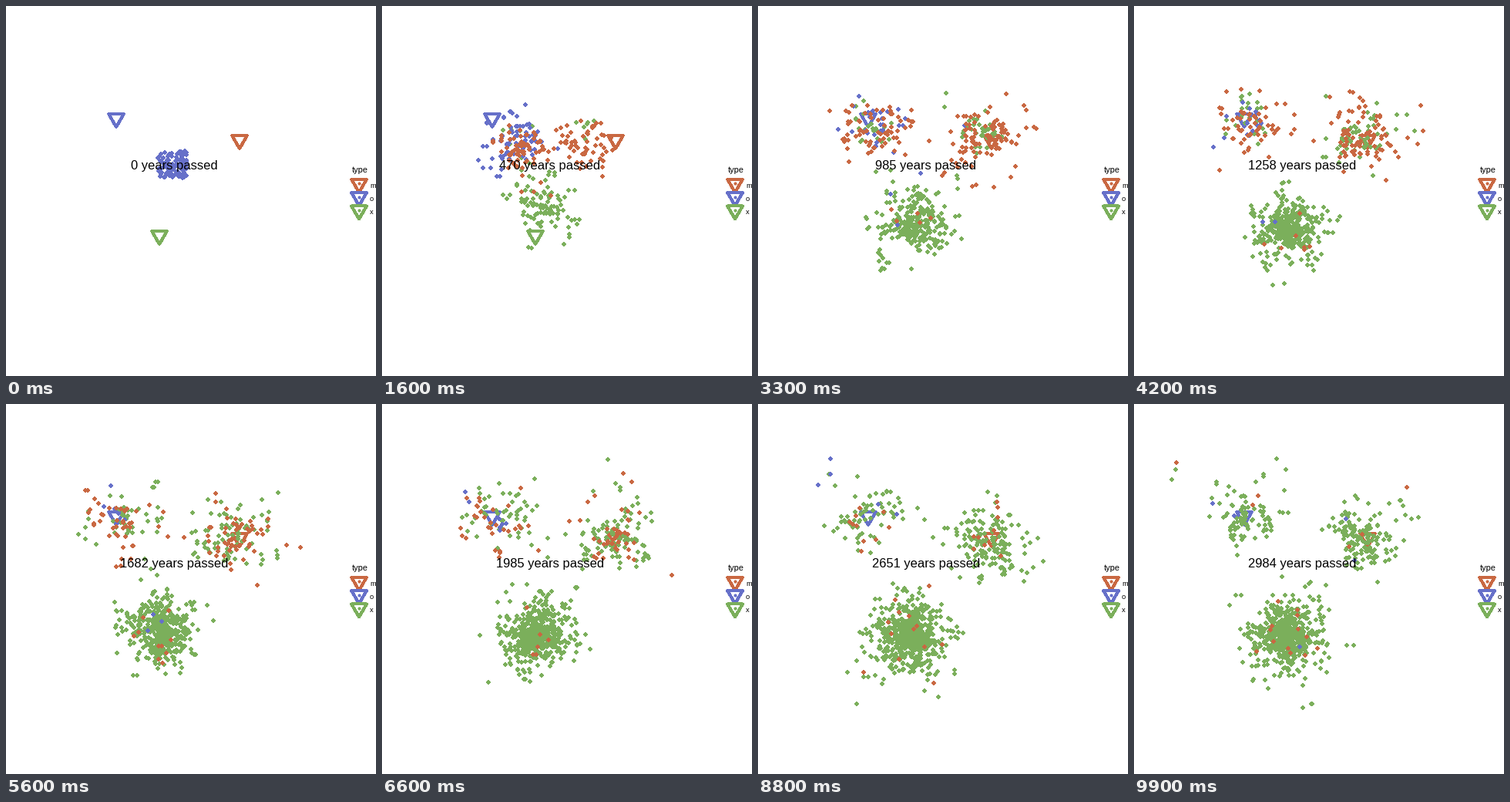
These frames come from a looping animation (480 by 480 pixels, 10 s). A matplotlib script:

```python
import numpy as np
import matplotlib.pyplot as plt
from matplotlib.animation import FuncAnimation
from matplotlib.patches import Polygon

SIZE, DPI, FRAMES = 480, 100, 100
PX = 72 / DPI  # points per pixel
FONT = "Liberation Sans"
NAMES = "mox"
COLORS = np.array(["#C96842", "#6670C9", "#7BAF5B"])
MARKETS = np.array([(303, 173.7), (143, 145.7), (199, 297.7)])
FOUNDERS = 110

PULL = 0.055    # share of the way home covered per step
INERTIA = 0.6
WANDER = 2.9
DEATH = 0.13


def targets(t):
    """Population of each type: m peaks and fades, o dies out, x takes over."""
    m = 175 * (t / 30 * np.exp(1 - t / 30)) ** 2
    o = (FOUNDERS - 5) * np.exp(-(t / 27) ** 1.6) + 5
    x = 900 * (1 - np.exp(-(t / 55) ** 1.6))
    return np.round([m, o, x]).astype(int)


def simulate(seed=4):
    """Settlers drift to their home market and settle children beside them."""
    rng = np.random.default_rng(seed)
    pos = rng.uniform((197, 187), (235, 223), (FOUNDERS, 2))
    vel = np.zeros_like(pos)
    kind = np.ones(FOUNDERS, int)
    home = kind.copy()
    roam = rng.uniform(0.3, 1.6, FOUNDERS)
    history = [(pos, kind)]

    for t in range(1, FRAMES):
        vel = INERTIA * vel + rng.normal(0, WANDER, pos.shape) * roam[:, None]
        pos = pos + vel + PULL * (MARKETS[home] - pos)

        stray = 0.03 + (t / FRAMES) ** 5
        stay, parents, kinds, homes = [], [], [], []
        for k, goal in enumerate(targets(t)):
            same = np.flatnonzero(kind == k)
            alive = same[rng.random(len(same)) > DEATH][:goal]
            stay.extend(alive)
            for _ in range(goal - len(alive)):
                if len(same) and rng.random() > stray:
                    p = rng.choice(same)
                    homes.append(home[p])
                else:
                    p = rng.integers(len(pos))
                    homes.append(home[p] if len(same) else k)
                parents.append(p)
                kinds.append(k)

        # children settle along one axis from the parent
        n = len(parents)
        offset = rng.normal(0, 10, (n, 1)) * np.eye(2)[rng.integers(2, size=n)]
        who = np.array(stay + parents, int)
        newborn = np.arange(len(who)) >= len(stay)
        pos, vel = pos[who], vel[who]
        pos[newborn] += offset
        roam = np.where(newborn, rng.uniform(0.3, 1.6, len(who)), roam[who])
        kind = np.append(kind[stay], kinds).astype(int)
        home = np.append(home[stay], homes).astype(int)
        history.append((pos, kind))
    return history


history = simulate()

fig = plt.figure(figsize=(SIZE / DPI, SIZE / DPI), dpi=DPI, facecolor="white")
ax = fig.add_axes([0, 0, 1, 1])
ax.set(xlim=(0, SIZE), ylim=(SIZE, 0))
ax.axis("off")


def triangle(x, y, color, r=11.3):
    w = r * np.sqrt(3) / 2
    ax.add_patch(Polygon([(x - w, y - r / 2), (x + w, y - r / 2), (x, y + r)],
                         fill=False, ec=color, lw=3 * PX, joinstyle="round",
                         antialiased=False, zorder=1))


def dots(xy, colors):
    return ax.scatter(*np.reshape(xy, (-1, 2)).T, s=(4.2 * PX) ** 2, c=colors,
                      linewidths=0, antialiased=False, zorder=2)


def label(x, y, text, px, ha="left"):
    return ax.text(x, y, text, fontsize=px * PX, family=FONT, ha=ha,
                   va="baseline", color="black", zorder=3)


for (x, y), color in zip(MARKETS, COLORS):
    triangle(x, y, color)

label(448.7, 216, "type", 11)
for i, (name, color) in enumerate(zip(NAMES, COLORS)):
    y = 230.5 + 17.3 * i
    triangle(458, y, color)
    dots((458, round(y)), [color])
    label(472, y + 5, name, 9.3)

points = dots((0, 0), [COLORS[1]])
counter = label(218, 212, "", 16.45, "center")


def update(frame):
    pos, kind = history[frame]
    order = np.argsort(-kind, kind="stable")  # rare types on top
    points.set_offsets(np.round(pos[order]))
    points.set_facecolors(COLORS[kind[order]])
    year = max(0, round(30.293 * frame - 14.6))
    counter.set_text(f"{year} years passed")
    return points, counter


anim = FuncAnimation(fig, update, frames=FRAMES, interval=100,
                     init_func=lambda: update(0), repeat=True, repeat_delay=0)
plt.show()
```
